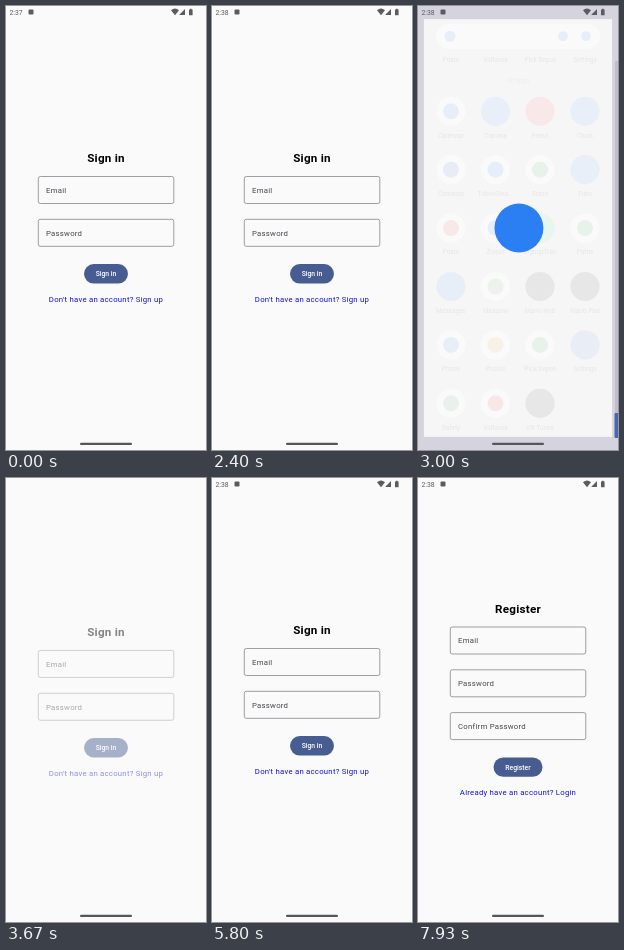
Write an HTML page that moves like this. It is 200x444 px and loops after 8 s.

```html
<!DOCTYPE html>
<html lang="en">
<head>
<meta charset="utf-8">
<title>Sign in and register</title>
<style>
  html, body { margin: 0; width: 100%; height: 100%; overflow: hidden; background: #fafafa; }
  svg { display: block; width: 100%; height: 100%; }
  text { font-family: Roboto, sans-serif; text-anchor: middle; }
  .title { font-size: 11.65px; font-weight: 700; letter-spacing: .24px; }
  .label { font-size: 7.77px; letter-spacing: .24px; text-anchor: start; fill: #46474e; }
  .button { font-size: 6.8px; font-weight: 500; fill: #fff; }
  .link { font-size: 7.77px; letter-spacing: .24px; fill: #1010d8; }
  .field { fill: none; stroke: #76777d; stroke-width: .7; }
  .app { font-size: 6.5px; fill: #303036; }
  .clock { font-size: 6.8px; text-anchor: start; }
</style>
</head>
<body>
<svg viewBox="0 0 200 444">
  <g id="drawer"></g>
  <g id="splash">
    <rect id="splashBack" width="200" height="444" fill="#fafafa"/>
    <circle cx="101" cy="222" r="26" fill="#2b7ff2"/>
  </g>
  <g id="screen">
    <rect width="200" height="444" fill="#fafafa"/>
    <g id="signIn"></g>
    <g id="register"></g>
  </g>
  <g id="status" fill="#5c5c60">
    <text id="clock" class="clock" x="3.5" y="8.5"></text>
    <rect x="22.5" y="3.5" width="5" height="5" rx="1"/>
    <path d="M165 4.2Q169 1 173 4.2L169 9.2Z M173.5 9V8.4L179 3V9Z"/>
    <path d="M183 3.5h1v-.8h1.6v.8h1V9.3h-3.6Z"/>
  </g>
  <rect x="74" y="436.8" width="52" height="2.2" rx="1.1" fill="#56565a"/>
</svg>
<script>
const $ = id => document.getElementById(id);
const LOOP = 8000;

const text = (cls, x, y, content) => `<text class="${cls}" x="${x}" y="${y}">${content}</text>`;
const disc = (x, y, r, fill) => `<circle cx="${x}" cy="${y}" r="${r}" fill="${fill}"/>`;

// A centred form; every part is placed relative to the middle of its title.
function form(middle, title, labels, buttonWidth, link) {
  const fieldTop = i => middle + 18.5 + i * 42.8;
  const buttonY = fieldTop(labels.length - 1) + 54.5;
  return text('title', 100, middle + 4.2, title) +
    labels.map((label, i) =>
      `<rect class="field" x="32.3" y="${fieldTop(i)}" width="135.5" height="27" rx="2"/>` +
      text('label', 40, fieldTop(i) + 16.3, label)).join('') +
    `<rect x="${100 - buttonWidth / 2}" y="${buttonY - 9.7}" width="${buttonWidth}" height="19.4" rx="9.7" fill="#475d92"/>` +
    text('button', 100, buttonY + 2.4, title) +
    text('link', 100, buttonY + 28, link);
}

// Each app: name, mark colour, tile colour (a full-size mark has no tile).
const columns = [33, 77.5, 122, 167];
const white = '#fff';
const rows = [
  [['Calendar', '#4285f4', white], ['Camera', '#4a86e8'], ['Ferrul', '#e64a3b'], ['Clock', '#4b8df0']],
  [['Contacts', '#3f6fdc', white], ['TokenGlea...', '#2b7ff2', white], ['Stash', '#2fa65a', white], ['Files', '#4a86e8']],
  [['Postu', '#e5493a', white], ['Zoquil', '#4285f4', white], ['SignupTrial', '#3ddc84'], ['Paths', '#34a853', white]],
  [['Messages', '#3f7be8'], ['Meadow', '#76a86a', white], ['Marlo Hub', '#303036'], ['Marlo Pod', '#303036']],
  [['Phone', '#3f7be8', white], ['Photos', '#e0a52f', white], ['Pick Depot', '#34a853', white], ['Settings', '#4a78d8']],
  [['Safety', '#5a9a6a', white], ['VidNook', '#e53935', white], ['VN Tunes', '#303036']]
];

function appRow(apps, row) {
  const y = 105.3 + row * 58.4;
  return apps.map(([name, mark, tile], i) => {
    const x = columns[i];
    return (tile ? disc(x, y, 14.6, tile) + disc(x, y, 8, mark) : disc(x, y, 14.6, mark)) +
      text('app', x, y + 26.3, name);
  }).join('');
}

$('drawer').innerHTML =
  '<rect width="200" height="444" fill="#d5d4de"/>' +
  '<rect x="197" y="55" width="3" height="352" fill="#bfbec9"/>' +
  '<rect x="196.5" y="407" width="4" height="25" rx="1" fill="#4a67ad"/>' +
  '<rect x="18" y="17.5" width="164" height="25.5" rx="12.75" fill="#fff"/>' +
  disc(32, 30.3, 5.5, '#4285f4') + disc(145, 30.3, 5, '#4285f4') + disc(168, 30.3, 5, '#4285f4') +
  ['Postu', 'VidNook', 'Pick Depot', 'Settings'].map((name, i) => text('app', columns[i], 55.8, name)).join('') +
  '<text class="app" x="100" y="77" style="fill:#85858d">All apps</text>' +
  rows.map(appRow).join('');

$('signIn').innerHTML = form(152, 'Sign in', ['Email', 'Password'], 44,
  "Don't have an account? Sign up");
$('register').innerHTML = form(130.5, 'Register', ['Email', 'Password', 'Confirm Password'], 49,
  'Already have an account? Login');

const progress = (t, start, length) => Math.min(1, Math.max(0, (t - start) / length));
const smooth = p => p * p * (3 - 2 * p);
const easeOut = p => 1 - (1 - p) ** 2;
const show = (id, visible) => $(id).style.display = visible ? '' : 'none';
const fade = (id, alpha) => $(id).setAttribute('opacity', alpha);
const move = (id, y) => $(id).setAttribute('transform', `translate(0 ${y})`);

function draw(t) {
  const closing = t < 3560;
  const opening = easeOut(progress(t, 2860, 280));
  const appear = progress(t, 3560, 240);
  const navigate = smooth(progress(t, 7070, 730));

  $('clock').textContent = t < 1930 ? '2:37' : '2:38';
  fade('status', t < 3140 ? 1 : progress(t, 3740, 120));

  show('splash', opening > 0 && closing);
  const scale = .76 + .24 * opening;
  $('splash').setAttribute('transform', `translate(100 222) scale(${scale}) translate(-100 -222)`);
  fade('splashBack', Math.min(1, opening * 1.2));

  show('screen', t < 2872 || !closing);
  move('screen', closing ? 444 * smooth(progress(t, 2422, 450)) : 0);

  move('signIn', closing ? 0 : 3.6 * (1 - appear));
  fade('signIn', closing ? 1 : appear * (1 - navigate));
  fade('register', navigate);
}

function tick() {
  draw(performance.now() % LOOP);
  requestAnimationFrame(tick);
}
tick();
</script>
</body>
</html>
```
